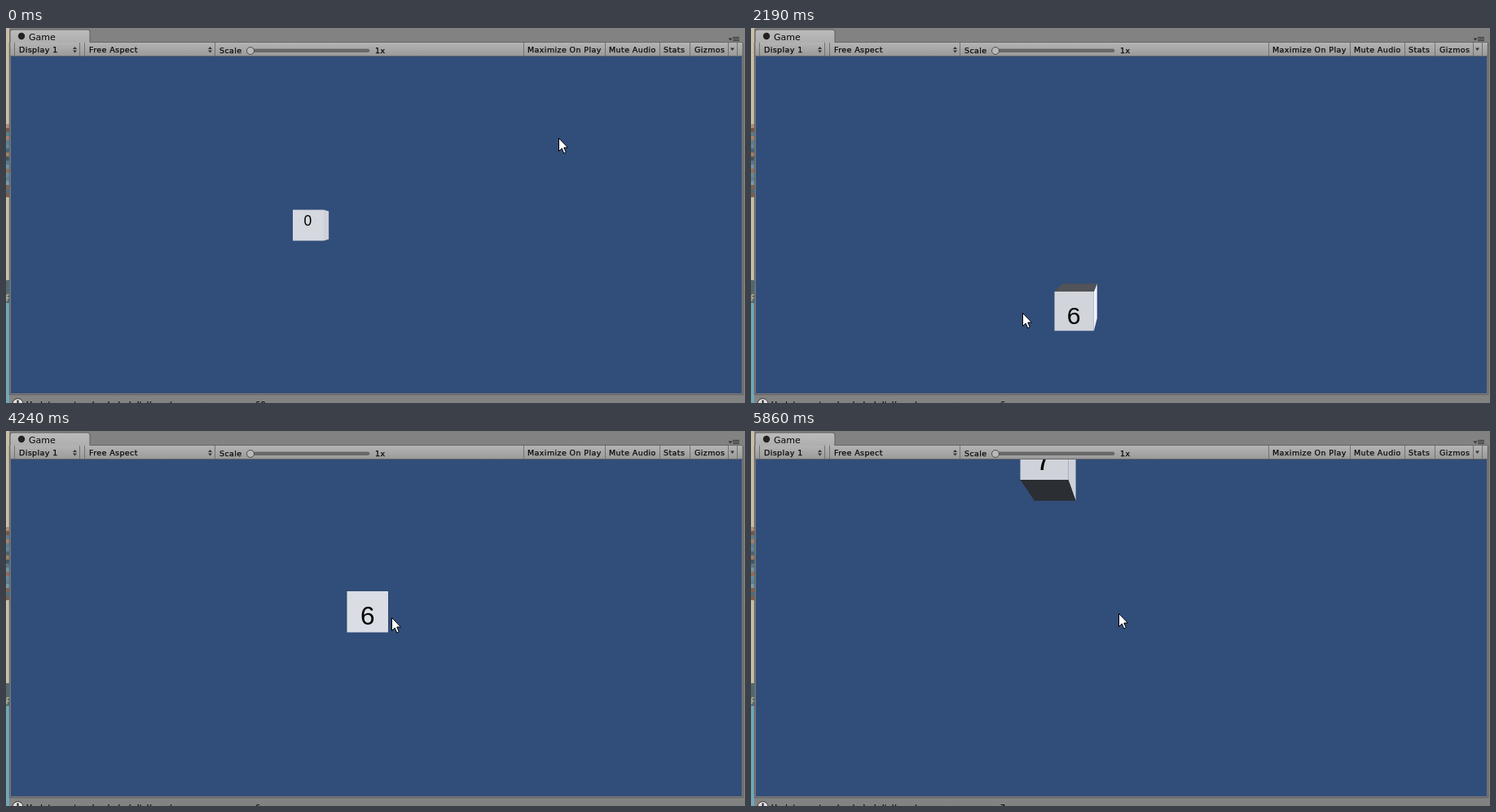
An HTML page for the animation above (5960 ms loop, 907 by 461 pixels).

```html
<!DOCTYPE html>
<html lang="en">
<head>
<meta charset="utf-8">
<title>Game view</title>
<style>
html, body { margin: 0; width: 100%; height: 100%; overflow: hidden; background: #828282; }
svg { display: block; width: 907px; height: 461px; }
.ui text { font: 9.5px "DejaVu Sans", sans-serif; letter-spacing: .4px; fill: #080808; stroke: #080808; stroke-width: .25px; white-space: pre; }
.ui .tab { font-size: 11px; letter-spacing: 0; stroke: none; }
#num { font-family: "Liberation Sans", Arial, sans-serif; text-anchor: middle; fill: #000; }
</style>
</head>
<body>
<svg viewBox="0 0 907 461">
  <defs>
    <linearGradient id="bar" x2="0" y2="1"><stop stop-color="#b4b4b4"/><stop offset="1" stop-color="#999"/></linearGradient>
    <linearGradient id="tab" x2="0" y2="1"><stop stop-color="#bcbcbc"/><stop offset="1" stop-color="#aeaeae"/></linearGradient>
    <clipPath id="view"><rect x="6" y="35" width="897" height="414"/></clipPath>
  </defs>
  <rect width="907" height="461" fill="#828282"/>
  <rect width="4" height="338" fill="#c9bfa8"/>
  <g id="stripes"></g>
  <rect y="310" width="4" height="28" fill="#4e6a70"/>
  <rect y="338" width="4" height="123" fill="#70a8b8"/>
  <path d="M1 336V328H4M1 332H4" fill="none" stroke="#e3c9a0"/>
  <g class="ui">
    <path d="M5 18V5q0-3 3-3h92q3 0 3 3v13" fill="url(#tab)" stroke="#5c5c5c"/>
    <circle cx="19" cy="10" r="4.2" fill="#222"/>
    <text class="tab" x="28" y="15">Game</text>
    <path d="M886.500 12.500h5l-2.500 3z" fill="#333"/>
    <path d="M892 11.500h8M892 13.500h8M892 15.500h8" stroke="#333"/>
    <rect x="5" y="18" width="899" height="17" fill="url(#bar)"/>
    <path d="M103 17.500H904M5 34.500H904" stroke="#686868"/>
    <g id="seps" stroke="#717171"></g>
    <g id="arrows" fill="#333"></g>
    <path d="M889 24.500h5l-2.500 3.500z" fill="#333"/>
    <text x="16" y="30">Display 1</text>
    <text x="102" y="30">Free Aspect</text>
    <text x="262" y="31">Scale</text>
    <text x="453" y="31">1x</text>
    <text x="640" y="30">Maximize On Play</text>
    <text x="740" y="30">Mute Audio</text>
    <text x="807" y="30">Stats</text>
    <text x="845" y="30">Gizmos</text>
    <rect x="297" y="26" width="149" height="3.500" rx="1.700" fill="#696969" stroke="#555" stroke-width=".6"/>
    <circle cx="300" cy="28" r="4.500" fill="#b8b8b8" stroke="#4e4e4e"/>
    <path d="M4.500 18V450.500H904.500V18" fill="none" stroke="#656565" stroke-width="1.500"/>
  </g>
  <rect x="6" y="35" width="897" height="414" fill="#314d79"/>
  <g clip-path="url(#view)">
    <path id="left" fill="#45484d"/>
    <path id="right"/>
    <path id="top" fill="#515358"/>
    <path id="bottom" fill="#2b2e33"/>
    <path id="front"/>
    <text id="num"></text>
  </g>
  <g class="ui">
    <circle cx="14.500" cy="462" r="6.500" fill="#ddd" stroke="#333"/>
    <path d="M14.500 457.500V464" stroke="#222" stroke-width="2"/>
    <g id="status"></g>
  </g>
  <path id="cursor" d="M.5 .5V16.500L4.200 13 6.800 19 9.300 17.900 6.800 12H11.500Z" fill="#fff" stroke="#000"/>
</svg>
<script>
const LOOP = 5960, STEP = 90;
const FOCAL = 359.4, VX = 454, VY = 242.5; // 60 degree camera, vanishing point
const $ = id => document.getElementById(id);

// weathered stripes beside the window
let seed = 7;
const random = () => (seed = seed * 16807 % 2147483647) / 2147483647;
for (let y = 118; y < 208; y += 5) {
  const warm = random() < .4, l = 30 + random() * 30;
  $("stripes").innerHTML += `<rect y="${y}" width="4" height="5" fill="hsl(${warm ? 25 : 200} 25% ${l}%)"/>`;
}
$("seps").innerHTML = [10, 90, 96, 256, 635, 735, 802, 839, 886, 897]
  .map(x => `<path d="M${x}.5 18V34"/>`).join("");
$("arrows").innerHTML = [82, 248]
  .map(x => `<path d="M${x} 26h5l-2.500-3zM${x} 27.500h5l-2.500 3z"/>`).join("");

// turning points: step, left, top, size
const cube = [
  [3, 352, 223.5, 38], [11, 280.5, 287, 40.5], [15, 253, 307, 43], [24, 372.5, 324, 48.3],
  [31, 447.5, 275, 45.5], [33, 449.5, 273.5, 44.5], [39, 503, 196, 44], [45, 417, 188, 49],
  [47, 418.5, 197, 50.5], [51, 374, 197, 50], [56.5, 409, 85, 50.5], [58, 378, 95.5, 51],
  [61, 298.5, 111, 55.5], [65, 330.5, 1, 59]];
// step, x, y
const mouse = [
  [0, 678, 135], [2, 628, 172], [3, 628, 172], [11, 362, 275], [17, 333, 348], [24, 333, 350],
  [31, 447, 320], [33, 455, 320], [45, 478, 249], [47, 473, 229], [56, 451, 224]];

// monotone cubic through the keys
function sample(keys, t) {
  const last = keys.length - 1;
  let i = 0;
  while (i < last - 1 && t >= keys[i + 1][0]) i++;
  const k = keys[i], m = keys[i + 1], h = m[0] - k[0];
  const u = Math.max(0, Math.min(1, (t - k[0]) / h)), v = 1 - u;
  const slope = (j, c) => (keys[j + 1][c] - keys[j][c]) / (keys[j + 1][0] - keys[j][0]);
  const tangent = (j, c) => {
    const a = slope(Math.max(0, j - 1), c), b = slope(Math.min(last - 1, j), c);
    return a * b <= 0 ? 0 : 2 * a * b / (a + b);
  };
  return k.slice(1).map((p, n) => {
    const c = n + 1;
    return p * v * v * (1 + 2 * u) + m[c] * u * u * (3 - 2 * u) +
      h * u * v * (tangent(i, c) * v - tangent(i + 1, c) * u);
  });
}

const grey = v => `rgb(${Math.round(v)},${Math.round(v + 3)},${Math.round(v + 10)})`;
const face = (id, show, ...p) => $(id).setAttribute("d", show ? "M" + p.map(q => q.join()).join("L") + "Z" : "");

function drawCube(x, y, s, n) {
  const r = x + s, b = y + s, k = FOCAL / (FOCAL + s);
  const scale = ([px, py], f) => [VX + (px - VX) * f, VY + (py - VY) * f];
  const A = [x, y], B = [r, y], C = [r, b], D = [x, b];
  const [a2, b2, c2, d2] = [A, B, C, D].map(p => scale(p, k));
  face("left", x > VX, A, a2, d2, D);
  face("right", r < VX, B, b2, c2, C);
  face("top", y > VY, A, a2, b2, B);
  face("bottom", b < VY, D, d2, c2, C);
  face("front", true, A, B, C, D);
  const off = Math.hypot(x + s / 2 - VX, y + s / 2 - VY);
  $("front").setAttribute("fill", grey(Math.max(207, 220 - off * .09)));
  $("right").setAttribute("fill", grey(Math.min(240, 196 + 44 * (Math.max(0, r - 321) / 100) ** 4)));
  // the digit floats slightly in front of the face
  const num = $("num"), [nx, ny] = scale([x + s / 2, y + s * (n ? .815 : .51)], 1.008);
  num.textContent = n;
  num.setAttribute("x", nx);
  num.setAttribute("y", ny);
  num.setAttribute("font-size", n ? s * .625 : 17.5);
}

function drawStatus(n) {
  const parts = n === 5
    ? [[26, "server"], [63, "t"], [70, "score now as"], [139, "l to"], [163, 5]]
    : [[25, "Updates not as loaded"], [151, "hdt //sum/"], [216, "nose res saves"], [306, n || 60]];
  $("status").innerHTML = parts.map(([x, s]) => `<text x="${x}" y="466">${s}</text>`).join("");
}

let shown = -1;
function render(ms) {
  const step = Math.floor(ms / STEP);
  if (step === shown) return;
  shown = step;
  const n = step < 7 ? 0 : step < 22 ? 5 : step < 56 ? 6 : 7;
  drawCube(...sample(cube, step), n);
  drawStatus(n);
  const [x, y] = sample(mouse, step).map(Math.round);
  $("cursor").setAttribute("transform", `translate(${x} ${y})`);
}

const start = performance.now();
function loop() {
  render((performance.now() - start) % LOOP);
  requestAnimationFrame(loop);
}
loop();
</script>
</body>
</html>
```
